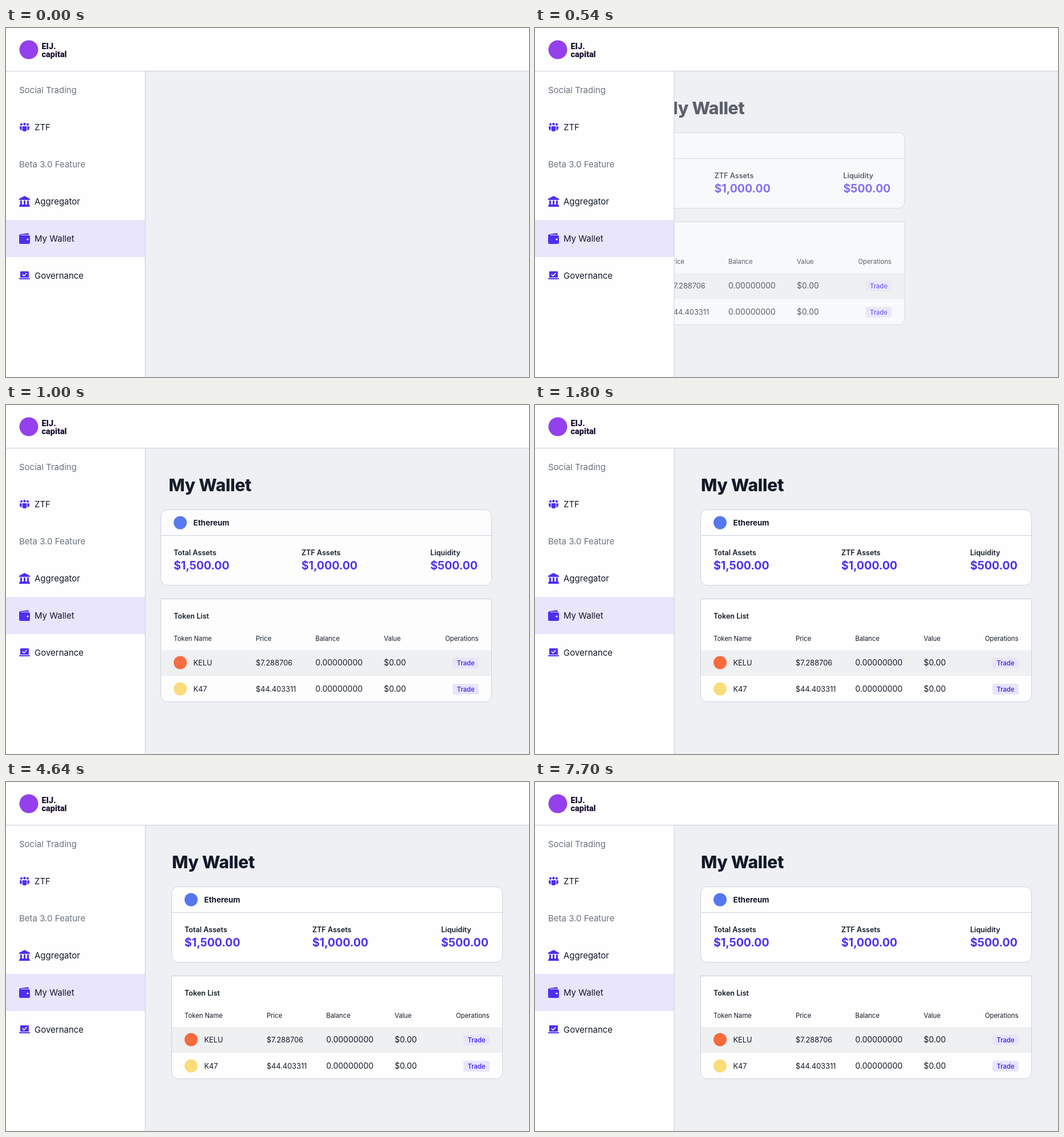
Recreate the animation shown at these times as an HTML page. Size 917x611 px, loop 7720 ms.

```html
<!DOCTYPE html>
<html lang="en">
<head>
<meta charset="utf-8">
<title>My Wallet</title>
<style>
  html, body { margin: 0; width: 100%; height: 100%; overflow: hidden; background: #eef0f3; }
  svg { display: block; width: 917px; height: 611px; font-family: Inter, "Open Sans", sans-serif; fill: #111827; }
  .line { fill: none; stroke: #c9cfdd; }
  .box { fill: #fefefe; stroke: #c9d1e0; }
  .icon { fill: #4f2ef0; }
  .cut { fill: none; stroke: #fefefe; }
  .nav { font-size: 15px; }
  .muted { fill: #6b7280; }
  .title { font-size: 30px; font-weight: 800; letter-spacing: -.3px; }
  .chain { font-size: 13.4px; font-weight: 700; }
  .label { font-size: 12.6px; font-weight: 600; }
  .sum { font-size: 19.5px; font-weight: 700; fill: #4f2ef0; }
  .head { font-size: 11.3px; }
  .cell { font-size: 12.8px; }
  .wide { font-size: 14px; }
  .btn { font-size: 11.2px; font-weight: 600; fill: #4f2ef0; }
  .brand { font: 900 14.5px Roboto, sans-serif; fill: #1b1030; }
</style>
</head>
<body>
<svg viewBox="0 0 917 611">
  <rect width="917" height="611" fill="#eef0f3"/>

  <g id="title" opacity="0"><text class="title" x="291" y="151">My Wallet</text></g>

  <g id="cards" opacity="0">
    <rect class="box" x="290.5" y="183.5" width="580" height="132" rx="11"/>
    <path class="line" d="M291 228.5H870"/>
    <circle cx="324.5" cy="206" r="11.5" fill="#5577ee"/>
    <text class="chain" x="347.5" y="211">Ethereum</text>
    <g class="label">
      <text x="313" y="263.3">Total Assets</text>
      <text x="537" y="263.3">ZTF Assets</text>
      <text x="763" y="263.3">Liquidity</text>
    </g>
    <g class="sum">
      <text x="313" y="287.6">$1,500.00</text>
      <text x="537" y="287.6">$1,000.00</text>
      <text x="763" y="287.6">$500.00</text>
    </g>

    <path class="box" d="M290.5 339.5H870.5V508.5a11 11 0 0 1-11 11H301.5a11 11 0 0 1-11-11Z"/>
    <rect x="291" y="429" width="579" height="45" fill="#eef0f2"/>
    <text class="label" x="313" y="374">Token List</text>
    <g class="head">
      <text x="313" y="413.3">Token Name</text>
      <text x="457" y="413.3">Price</text>
      <text x="561.5" y="413.3">Balance</text>
      <text x="681.5" y="413.3">Value</text>
      <text x="847.5" y="413.3" text-anchor="end">Operations</text>
    </g>
    <g id="rows"></g>
  </g>

  <rect y="76" width="244" height="535" fill="#fefefe"/>
  <rect width="917" height="76" fill="#fefefe"/>
  <rect y="336" width="244" height="65" fill="#e9e5fb"/>
  <path class="line" d="M0 75.5H917M244 76V611"/>

  <circle cx="40" cy="38" r="16.5" fill="#9440ec"/>
  <g class="brand"><text x="62.5" y="36.5">EIJ.</text><text x="62.5" y="51">capital</text></g>

  <g class="nav">
    <text class="muted" x="23" y="113.5">Social Trading</text>
    <text x="50" y="178.5">ZTF</text>
    <text class="muted" x="23" y="243.5">Beta 3.0 Feature</text>
    <text x="50" y="308.5">Aggregator</text>
    <text x="50" y="373.5">My Wallet</text>
    <text x="50" y="438.5">Governance</text>
  </g>

  <g class="icon">
    <circle cx="27" cy="168.8" r="2.1"/><circle cx="32.5" cy="168.3" r="2.3"/><circle cx="38" cy="168.8" r="2.1"/>
    <path d="M28.7 172H36.3V178a3 3 0 0 1-3 3H31.7a3 3 0 0 1-3-3ZM24 172.2H27.6V179.4Q24 178.6 24 175ZM41 172.2H37.4V179.4Q41 178.6 41 175Z"/>
    <path d="M32.5 294L42 299V301H23V299ZM25 302H28V309H25ZM31 302H34V309H31ZM37 302H40V309H37ZM24 309H41V311H42V313H23V311H24Z"/>
    <path d="M25.5 361L37.5 359.2Q40 359 40 362H26.5V363H39.5Q42 363 42 365.5V375.5Q42 378 39.5 378H25.5Q23 378 23 375.5V363.5Q23 361.4 25.5 361Z"/>
    <path d="M26 426H39Q40 426 40 427V437H25V427Q25 426 26 426ZM23 438H42V439Q42 440 41 440H24Q23 440 23 439Z"/>
  </g>
  <circle cx="38" cy="370" r="1.6" fill="#fefefe"/>
  <path class="cut" stroke-width="1.5" d="M28.8 431.4L31.6 434.2L36.5 429"/>
</svg>
<script>
const LOOP = 7720, START = 144, SLIDE = 1112;
const $ = id => document.getElementById(id);

const row = (y, color, name, price) => `
  <circle cx="324.5" cy="${y}" r="11.5" fill="${color}"/>
  <g class="cell">
    <text x="347.5" y="${y + 4.5}">${name}</text>
    <text x="457" y="${y + 4.5}">${price}</text>
    <text class="wide" x="561.5" y="${y + 4.5}">0.00000000</text>
    <text class="wide" x="681.5" y="${y + 4.5}">$0.00</text>
  </g>
  <rect x="802" y="${y - 9}" width="46" height="19" rx="3" fill="#e9e5fb"/>
  <text class="btn" x="825" y="${y + 4.5}" text-anchor="middle">Trade</text>`;
$('rows').innerHTML = row(451, '#f96a3c', 'KELU', '$7.288706') + row(497, '#fbdc7a', 'K47', '$44.403311');

// Standard "ease" curve, cubic-bezier(.25, .1, .25, 1)
function ease(x) {
  if (x <= 0) return 0;
  if (x >= 1) return 1;
  let lo = 0, hi = 1;
  for (let i = 0; i < 24; i++) {
    const u = (lo + hi) / 2;
    if (.75 * u * (1 - u) + u ** 3 < x) lo = u; else hi = u;
  }
  return .3 * lo * (1 - lo) ** 2 + 3 * (1 - lo) * lo ** 2 + lo ** 3;
}

function slide(id, width, p) {
  $(id).setAttribute('transform', `translate(${-width * (1 - p)} 0)`);
  $(id).setAttribute('opacity', p ** .85);
}

function draw() {
  const p = ease((performance.now() % LOOP - START) / SLIDE);
  slide('title', 179, p);
  slide('cards', 580, p);
  requestAnimationFrame(draw);
}
draw();
</script>
</body>
</html>
```
